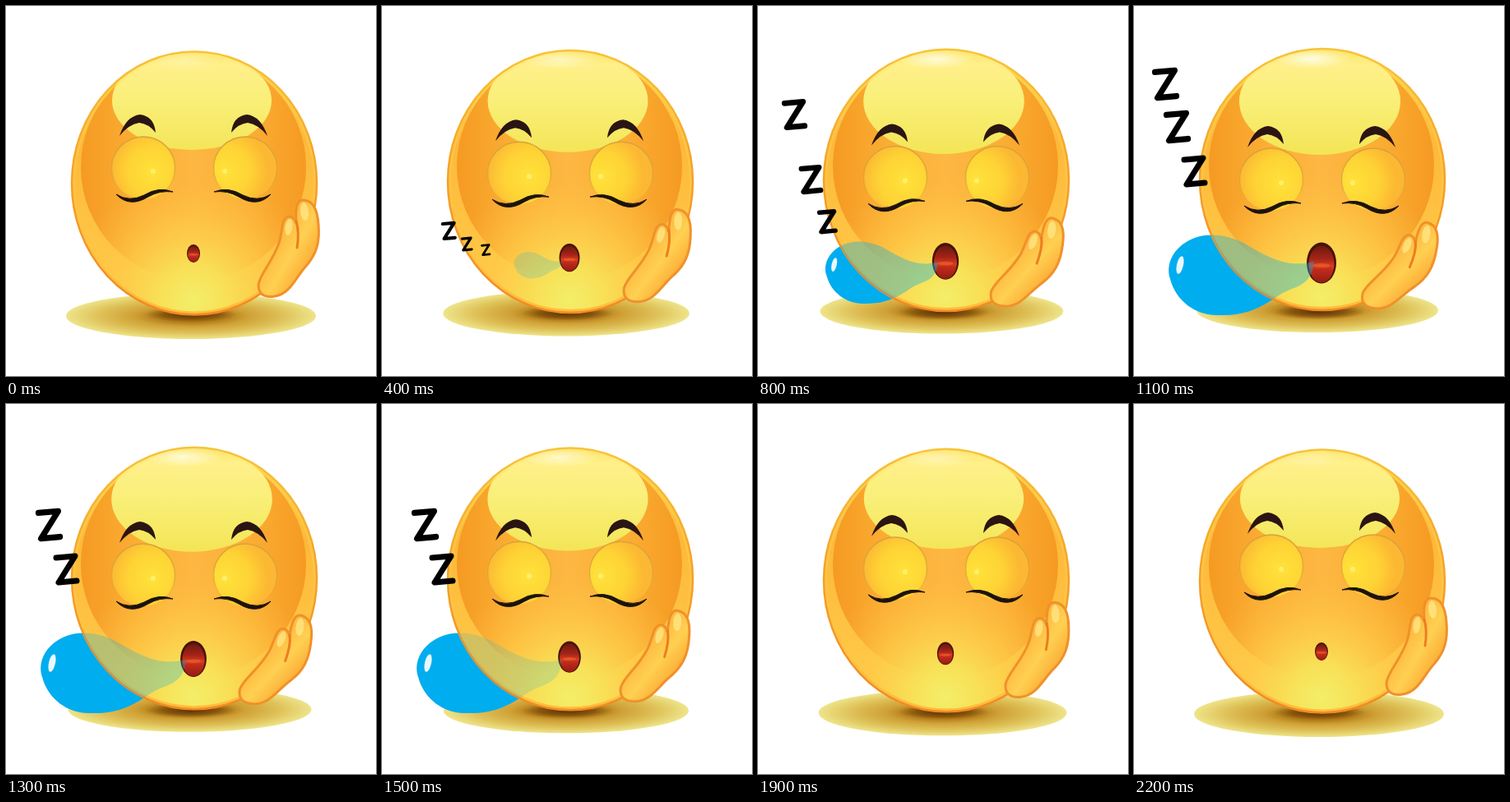
Animation of 450x450 px, one loop 2400 ms. Source, as an HTML page with a canvas:

```html
<!DOCTYPE html>
<html lang="en">
<head>
<meta charset="utf-8">
<title>Sleeping face</title>
<style>
html, body { margin: 0; width: 100%; height: 100%; overflow: hidden; background: #fff; }
canvas { display: block; }
</style>
</head>
<body>
<canvas id="stage" width="450" height="450"></canvas>
<script>
const c = document.getElementById('stage').getContext('2d');
const LOOP = 2400, STEP = 50, HALF = 1100;

const BROW = new Path2D('M138 158Q146 134 163 132Q180 134 182 154Q173 143 162 142Q149 144 138 158Z');
const LASH = new Path2D('M134 229Q150 239 168 230Q186 219 203 226Q187 224 173 232Q150 246 134 229Z');
const HAND = new Path2D('M307 339C309 325 324 312 332 288C337 274 334 258 344 256Q350 256 353 264' +
  'C352 248 353 236 361 236C374 236 379 250 380 266C382 288 377 302 366 315C352 330 346 350 327 353C316 355 307 352 307 339Z');
const CREASE = new Path2D('M353 262Q357 275 354 294');
// Local to the mouth corner
const BUBBLE = new Path2D('M0 -7C-38 2 -62 -17 -88 -31C-108 -40 -131 -43 -150 -34C-171 -24 -181 -4 -175 14' +
  'C-168 41 -144 58 -118 58C-84 59 -66 50 -43 34C-25 22 -3 25 0 -7Z');
const LETTER = new Path2D('M-12 -15L11 -17L-9 15L13 13');

// Piecewise linear value from [time, value] pairs
function key(t, ...ks) {
  if (t <= ks[0][0]) return ks[0][1];
  for (let i = 1; i < ks.length; i++) {
    const [a, x] = ks[i - 1], [b, y] = ks[i];
    if (t < b) return x + (y - x) * (t - a) / (b - a);
  }
  return ks[ks.length - 1][1];
}

function stops(g, list) {
  list.forEach(([at, color]) => g.addColorStop(at, color));
  return g;
}
const linear = (x0, y0, x1, y1, ...s) => stops(c.createLinearGradient(x0, y0, x1, y1), s);
const radial = (x, y, r, ...s) => stops(c.createRadialGradient(x, y, 0, x, y, r), s);

function ellipse(x, y, rx, ry, fill, tilt = 0) {
  c.beginPath();
  c.ellipse(x, y, rx, ry, tilt, 0, Math.PI * 2);
  c.fillStyle = fill;
  c.fill();
}

function at(x, y, sx, sy, draw) {
  c.save();
  c.translate(x, y);
  c.scale(sx, sy);
  draw();
  c.restore();
}

function mirrored(draw) {
  draw();
  at(456, 0, -1, 1, draw);
}

function shadow(p) {
  at(225 - 2 * p, 377 - 7 * p, 152 - 5 * p, 28 - p, () =>
    ellipse(0, 0, 1, 1, radial(0, 0, 1, [0, '#8a5608'], [.22, '#a87012'], [.45, '#cfa035'],
      [.75, '#dfc35a'], [1, '#eee48a'])));
  at(225, 375 - 3 * p, 56, 9, () =>
    ellipse(0, 0, 1, 1, radial(0, 0, 1, [0, '#5c3206'], [.6, '#70450c99'], [1, '#8a560800'])));
}

function facePath(p) {
  c.beginPath();
  c.ellipse(229, 215.5 - 4.5 * p, 149, 160 - p, 0, 0, Math.PI * 2);
}

function face(p) {
  c.save();
  facePath(p);
  c.fillStyle = linear(0, 52, 0, 375, [0, '#ffdc52'], [.35, '#fdb83a'], [.7, '#ffc443'], [1, '#ffcf4c']);
  c.fill();
  c.clip();
  ellipse(228, 196 - 2 * p, 137, 138, linear(91, 0, 365, 0, [0, '#f59a22'], [.25, '#fbae34'],
    [.5, '#fdb743'], [.75, '#fbae34'], [1, '#f59a22']));
  c.fillStyle = radial(228, 358 - 4 * p, 155, [0, '#f3ee68'], [.25, '#f8e158'], [.6, '#fecb47b0'], [1, '#fdbb4000']);
  c.fillRect(70, 180, 320, 200);
  ellipse(226, 115 + p, 97 + p, 60 + 5 * p, linear(0, 53, 0, 178, [0, '#fde468'], [.15, '#fff08a'],
    [.5, '#f9ef78'], [1, '#f4e557']));
  at(216, 66 - 2 * p, 48, 12, () => ellipse(0, 0, 1, 1,
    radial(0, 0, 1, [0, `rgba(255,255,240,${.3 + .6 * p})`], [1, '#fffff000'])));
  facePath(p);
  c.lineWidth = 8;
  c.strokeStyle = linear(0, 55, 0, 375, [0, '#ffd95000'], [.35, '#ffc84ac0'], [1, '#ffbd3c']);
  c.stroke();
  c.restore();
  facePath(p);
  c.lineWidth = 2.5;
  c.strokeStyle = linear(0, 52, 0, 376, [0, '#f8c438'], [.4, '#f5a52a'], [1, '#f18a23']);
  c.stroke();
}

function eye(x, glow) {
  ellipse(x, 197, 38.5, 38, radial(glow, 201, 52, [0, '#ffeb55'], [.08, '#ffe039'], [.6, '#fed335'], [1, '#fcb833']));
  c.lineWidth = 1.5;
  c.strokeStyle = linear(0, 159, 0, 235, [0, '#d8a238'], [.55, '#d8a238b0'], [.9, '#d8a23800']);
  c.stroke();
  ellipse(glow, 201, 3, 3, '#ffef70');
}

function features(p) {
  at(0, 14 * p, 1, 1, () => {
    eye(167, 179);
    eye(291, 266);
    mirrored(() => {
      c.fillStyle = '#2b1513';
      c.fill(BROW);
      c.fillStyle = c.strokeStyle = '#1c120e';
      c.lineWidth = 1;
      c.fill(LASH);
      c.stroke(LASH);
    });
  });
  at(228, 301 + 11.5 * p, 8 + 10 * p, 11 + 14 * p, () => {
    ellipse(0, 0, 1, 1, '#481309');
    ellipse(0, .06, .86, .9, linear(0, -1, 0, 1, [0, '#5e160d'], [.4, '#a52418'], [.58, '#d83c20'],
      [.66, '#c12b1b'], [1, '#8f1c12']));
    ellipse(0, .12, .6, .1, '#f06a2a90');
  });
}

function hand(p) {
  c.save();
  c.translate(307 - 29 * p, 340 + 10 * p);
  c.rotate(p * Math.PI / 12);
  c.translate(-307, -340);
  c.fillStyle = linear(318, 290, 372, 322, [0, '#fdb23a'], [.5, '#ffd052'], [1, '#fba52f']);
  c.fill(HAND);
  c.lineWidth = 3;
  c.lineCap = c.lineJoin = 'round';
  c.strokeStyle = '#f0912a';
  c.stroke(HAND);
  c.strokeStyle = '#ee7d20';
  c.stroke(CREASE);
  ellipse(344, 269, 4.5, 10, '#ffe888c0', .15);
  ellipse(363, 250, 5, 11, '#ffe888c0', -.1);
  c.restore();
}

function bubble(t, draw) {
  const s = key(t, [150, 0], [400, .33], [800, .775], [HALF, 1]);
  if (s > 0) at(219, key(t, [150, 308], [400, 312], [800, 317], [HALF, 318]), s, s, draw);
}

function blueBubble() {
  c.fillStyle = '#00adef';
  c.fill(BUBBLE);
  ellipse(-163, -3, 4, 11, '#e9f8ff', .22);
}

function veil(t, p) {
  c.save();
  facePath(p);
  c.clip();
  c.globalAlpha = key(t, [150, .12], [400, .2], [800, .4], [HALF, .4], [1860, 0]);
  bubble(t, () => {
    c.fillStyle = '#10b0dc';
    c.fill(BUBBLE);
  });
  c.restore();
}

const letters = [
  { end: 1300, x: [118, 81, 44, 38], y: [300, 274, 133, 96], s: [.25, .6, .98, 1.04] },
  { end: 1600, x: [130, 103, 64, 52], y: [303, 290, 212, 148], s: [.2, .46, .93, 1.04] },
  { end: 1700, x: [145, 126, 84, 73], y: [305, 297, 263, 202], s: [.15, .38, .78, 1] }
];

function letter(t, z) {
  if (t < 250 || t >= z.end) return;
  const v = list => key(t, ...[250, 400, 800, HALF].map((k, i) => [k, list[i]]));
  const s = v(z.s);
  at(v(z.x), v(z.y), s, s, () => {
    c.lineWidth = 7;
    c.lineCap = c.lineJoin = 'round';
    c.strokeStyle = '#000';
    c.stroke(LETTER);
  });
}

function breath(t) {
  if (t <= HALF) return 1 - (1 - t / HALF) ** 1.3;
  return t < 2 * HALF ? (2 - t / HALF) ** 1.2 : 0;
}

function draw(now) {
  const t = Math.floor(now % LOOP / STEP) * STEP;
  const p = breath(t);
  c.fillStyle = '#fff';
  c.fillRect(0, 0, 450, 450);
  shadow(p);
  if (t < 1700) bubble(t, blueBubble);
  face(p);
  features(p);
  veil(t, p);
  hand(p);
  letters.forEach(z => letter(t, z));
}

const start = performance.now();
function tick() {
  draw(performance.now() - start);
  requestAnimationFrame(tick);
}
tick();
</script>
</body>
</html>
```
